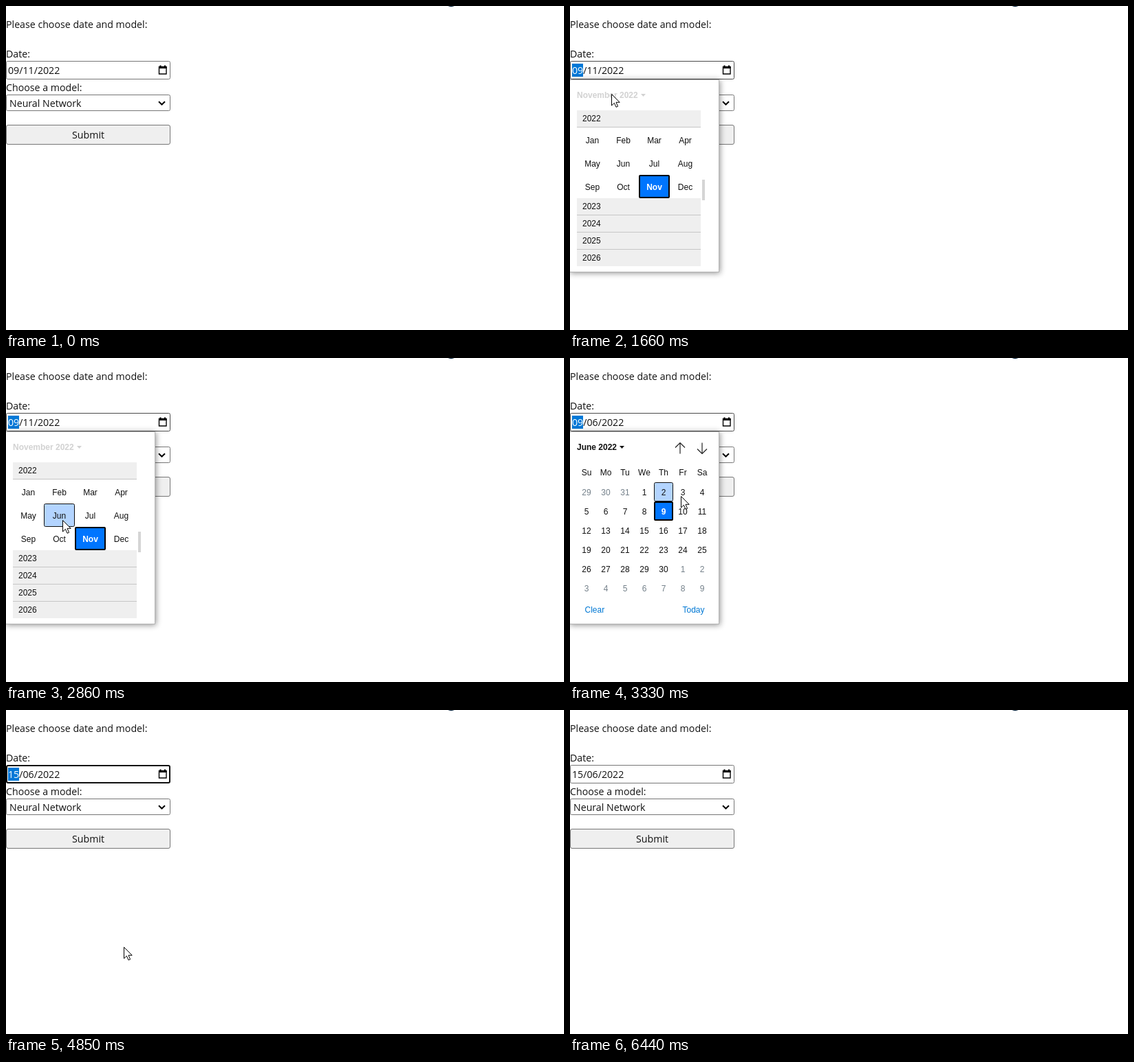
Recreate the animation shown at these times as an HTML page. Size 811x472 px, loop 6.58 s.

```html
<!DOCTYPE html>
<html lang="en">
<head>
<meta charset="utf-8">
<title>Date and model form</title>
<style>
  html, body { margin: 0; width: 100%; height: 100%; overflow: hidden; background: #fff; }
  svg { display: block; width: 811px; height: 472px; }
  .form { font: 14.2px "Open Sans", "Noto Sans", sans-serif; fill: #111; }
  .popup { font: 12px "Liberation Sans", Arial, sans-serif; fill: #101010; }
  .mid { text-anchor: middle; }
  .bold { font-weight: 700; }
  .shadow { filter: drop-shadow(1px 1px 4px rgba(0, 0, 0, .45)); }
</style>
</head>
<body>
<svg viewBox="0 0 811 472">
  <ellipse cx="647" cy="-2.6" rx="6.5" ry="3.8" fill="#0d2b45"/>
  <g class="form">
    <text x="0" y="32">Please choose date and model:</text>
    <text x="0" y="75">Date:</text>
    <text x="0" y="124">Choose a model:</text>
    <rect x=".5" y="129.5" width="238" height="23" rx="2" fill="#fff" stroke="#767676"/>
    <text x="5" y="147">Neural Network</text>
    <path d="M222 139.2l4.5 4.3 4.5-4.3" fill="none" stroke="#000" stroke-width="2"/>
    <rect x=".5" y="173.5" width="238" height="28" rx="2.5" fill="#efefef" stroke="#767676"/>
    <text class="mid" x="119.5" y="193">Submit</text>
    <g id="field"></g>
  </g>
  <g id="popup" class="popup"></g>
  <path id="cursor" d="M.5 .5V17l3.9-3.7 2.6 6 2.6-1.1-2.6-5.9h5.2z" fill="#fff" stroke="#000"/>
</svg>
<script>
const LOOP = 6580, TICKS = 99, TICK = LOOP / TICKS;
const OPEN = 11, MONTHS = 22, PICKED_MONTH = 46, CLOSE = 69, BLUR = 97;
const CURSOR_IN = 1, CURSOR_OUT = 86, FIELD_HOVER = 9;

// Pointer path: [tick, x, y]
const path = [
  [1, 597, 340], [4, 440, 140], [7, 290, 25], [10, 233, 78], [13, 230, 85],
  [14, 230, 85], [20, 64, 126], [25, 60, 128], [30, 78, 168], [33, 94, 239],
  [36, 86, 257], [39, 86, 257], [43, 82, 236], [46, 84, 234], [49, 141, 205],
  [50, 161, 201], [55, 137, 213], [62, 112, 254], [65, 111, 253], [68, 111, 253],
  [71, 140, 386], [73, 171, 345], [76, 188, 355], [78, 188, 355], [85, 523, 440]
];

const monthNames = "Jan Feb Mar Apr May Jun Jul Aug Sep Oct Nov Dec".split(" ");
const $ = id => document.getElementById(id);

const label = (x, y, s, attrs = "") => `<text x="${x}" y="${y}" ${attrs}>${s}</text>`;
const box = (x, y, w, h, fill, stroke = "none", line = 0, rx = 0) =>
  `<rect x="${x + line / 2}" y="${y + line / 2}" width="${w - line}" height="${h - line}"
    rx="${rx}" fill="${fill}" stroke="${stroke}" stroke-width="${line}"/>`;

function pointer(tick) {
  const next = path.findIndex(p => p[0] >= tick);
  if (next < 0) return path[path.length - 1].slice(1);
  if (next === 0) return path[0].slice(1);
  const [a, ax, ay] = path[next - 1], [b, bx, by] = path[next];
  const k = (tick - a) / (b - a);
  return [ax + (bx - ax) * k, ay + (by - ay) * k];
}

function cell(x, y, w, h, text, { selected, hovered, today, muted }) {
  let back = "";
  if (selected) back = box(x, y, w, h, "#0075ff", "#000", 2, 1);
  else if (hovered) back = box(x, y, w, h, "#b3d4ff", "#101010", 1, 2);
  else if (today) back = box(x, y, w, h, "#fff", "#767676", 1, 2);
  const fill = selected ? "#fff" : muted ? "#74808a" : "#101010";
  return back + label(x + w / 2, y + h / 2 + 4.5, text,
    `class="mid${selected ? " bold" : ""}" fill="${fill}"`);
}

const inside = ([px, py], x, y, w, h) => px >= x && px < x + w && py >= y && py < y + h;

function heading(text, width, color) {
  return label(10, 134, text, `class="bold" fill="${color}"`) +
    `<path d="M${14 + width} 128h7l-3.5 4z" fill="${color}"/>`;
}

function dayView(month, hover) {
  let out = month === 10 ? heading("November 2022", 89, "#101010") : heading("June 2022", 58, "#101010");
  out += `<path d="M160 139.500V123.500M153 130.500l7-7 7 7M192 123.500v16M185 132.500l7 7 7-7"
    fill="none" stroke="#222" stroke-width="1.200"/>`;
  "Su Mo Tu We Th Fr Sa".split(" ").forEach((d, i) => out += label(24 + 28 * i, 171, d, 'class="mid"'));
  const lead = new Date(2022, month, 1).getDay();
  for (let i = 0; i < 42; i++) {
    const date = new Date(2022, month, 1 - lead + i), day = date.getDate();
    const x = 10 + 28 * (i % 7), y = 181 + 28 * Math.floor(i / 7);
    const muted = date.getMonth() !== month;
    out += cell(x, y, 28, 28, day, {
      muted,
      selected: !muted && day === 9,
      today: !muted && month === 10 && day === 10,
      hovered: inside(hover, x, y, 28, 28)
    });
  }
  return out + label(21.5, 371, "Clear", 'fill="#0078d4"') + label(163.5, 371, "Today", 'fill="#0078d4"');
}

function monthView(hover) {
  let out = heading("November 2022", 89, "#d2d2d2");
  [152, 280, 305, 330, 355].forEach((y, i) => {
    out += box(10, y, 180, 24, "#efefef") + label(18, y + 16, 2022 + i);
    if (i < 4) out += box(10, y + 24, 180, 1, "#c6c6c6");
  });
  monthNames.forEach((name, i) => {
    const x = 10 + 45 * (i % 4), y = 178 + 34 * Math.floor(i / 4);
    out += cell(x, y, 45, 34, name, { selected: i === 10, hovered: inside(hover, x, y, 45, 34) });
  });
  return out + box(192, 253, 4, 30, "#d5d5d5");
}

function popup(tick) {
  if (tick < OPEN || tick >= CLOSE) return "";
  const hover = pointer(tick - 1); // highlight trails the pointer slightly
  const frame = `<g class="shadow">${box(-1, 107, 218, 281, "#fff", "#b4b4b4", 1)}</g>`;
  if (tick < MONTHS) return frame + dayView(10, hover);
  return frame + (tick < PICKED_MONTH ? monthView(hover) : dayView(5, hover));
}

function field(tick) {
  const active = tick >= OPEN && tick < BLUR;
  const focusRing = tick >= CLOSE && tick < BLUR;
  const day = tick < CLOSE ? "09" : "15", month = tick < PICKED_MONTH ? "11" : "06";
  const border = focusRing ? "#101010" : tick >= FIELD_HOVER && tick < CLOSE ? "#4a4a4a" : "#767676";
  return box(0, 80, 239, 27, "#fff", border, focusRing ? 2 : 1, 2) +
    (active ? box(3, 84, 16, 19, "#0078d7") : "") +
    label(3, 99, `<tspan fill="${active ? "#fff" : "#111"}">${day}</tspan>/${month}/2022`) +
    `<path d="M222.500 88.500h10.500v10.500h-10.500z" fill="none" stroke="#000" stroke-width="1.400"/>
     <path d="M222 88h11.500v3H222zM223.500 86.500h2v2h-2zM230 86.500h2v2h-2z" fill="#000"/>`;
}

let shown = -1;
function draw() {
  const time = performance.now() % LOOP;
  const tick = Math.floor((time + 10) / TICK) % TICKS;
  if (tick !== shown) {
    shown = tick;
    $("field").innerHTML = field(tick);
    $("popup").innerHTML = popup(tick);
    const [x, y] = pointer(tick).map(Math.round);
    $("cursor").setAttribute("transform", `translate(${x} ${y})`);
    $("cursor").style.display = tick >= CURSOR_IN && tick < CURSOR_OUT ? "" : "none";
  }
  requestAnimationFrame(draw);
}
draw();
</script>
</body>
</html>
```
